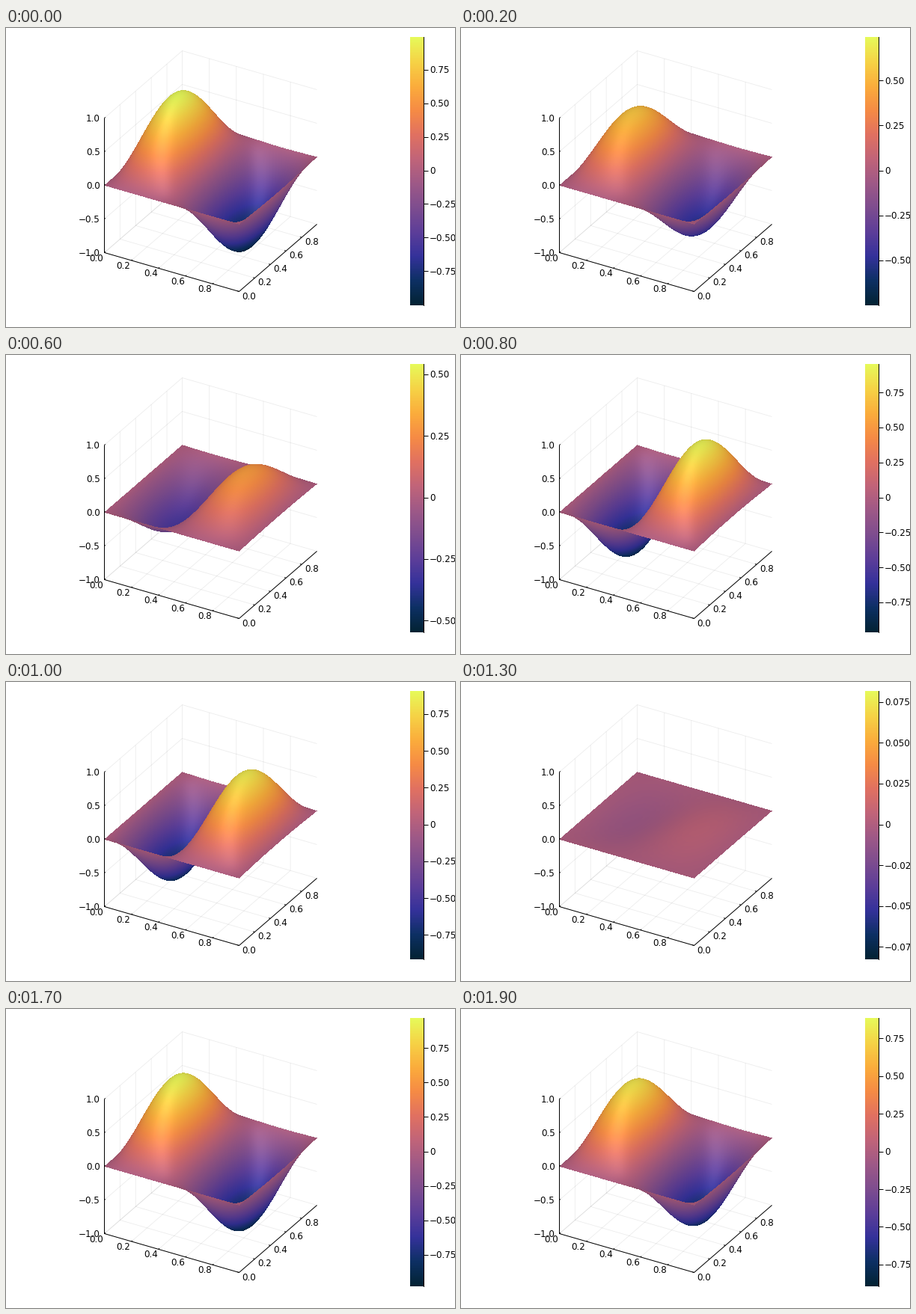
Animation of 600 by 400 pixels, one loop 2000 ms. Source, as a matplotlib script:

```python
import math

import numpy as np
import matplotlib.pyplot as plt
from matplotlib.animation import FuncAnimation
from matplotlib.collections import LineCollection
from matplotlib.colors import LinearSegmentedColormap

W, H, DPI = 600, 400, 100
PX = 72 / DPI                      # points per pixel
FRAMES, INTERVAL = 20, 100
PHASE0, PHASE_STEP = 0.0177, 0.3548
FONT_PX = 11.85
BASELINE = 0.34 * FONT_PX          # from the middle of a digit to its foot
X_MAX = 0.996                      # the grid stops just short of 1

# Projection: azimuth 30, elevation 30, orthographic
ORIGIN = np.array([131.5, 210.5])
EX = np.array([180.0, 52.0])
EY = np.array([104.0, -90.0])
EZ = np.array([0.0, -90.0])
VIEW = (0.433, -0.75, 0.5)

# Colour bar
BAR_L, BAR_R, BAR_TOP, BAR_BOTTOM = 540, 558, 12, 371
BAR_MID, BAR_HALF = 191, 179.5

THERMAL = [(3, 35, 51), (13, 48, 100), (53, 50, 155), (93, 62, 153),
           (126, 77, 143), (158, 89, 135), (193, 100, 121), (225, 113, 97),
           (246, 139, 69), (251, 173, 60), (246, 211, 70), (231, 250, 90)]
cmap = LinearSegmentedColormap.from_list("thermal", np.array(THERMAL) / 255, N=256)
lut = cmap(np.arange(256))[:, :3]


def project(u, v, z):
    """Unit square position plus height to stage pixels."""
    return tuple(ORIGIN + u * EX + v * EY + z * EZ)


def label(x, y, text="", ha="center"):
    return ax.text(x, y + BASELINE, text, ha=ha, va="baseline",
                   fontsize=FONT_PX * PX, family="DejaVu Sans", color="black", zorder=5)


def lines(segments, width, alpha=1.0, zorder=4):
    coll = LineCollection(segments, colors=[(0, 0, 0, alpha)],
                          linewidths=width * PX, zorder=zorder, snap=False)
    ax.add_collection(coll)
    return coll


def number(value, digits):
    return f"{value:.{digits}f}".replace("-", "\u2212")


def bar_ticks(amp):
    """Pick a pleasant tick step for the range -amp..amp."""
    best = (-1, 0, 0)
    for q, nice in ((1, 1), (5, 0.9), (2, 0.7), (2.5, 0.5), (3, 0.2)):
        for power in (-2, -1):
            step = q * 10.0 ** power
            half = math.floor(amp / step)
            count = 2 * half + 1
            if 4 <= count <= 8:
                score = (1 - abs(count - 5) / 5) / 4 + nice / 4 + half * step / amp / 3
                best = max(best, (score, step, half))
    _, step, half = best
    digits = next(d for d in range(1, 5) if abs(round(step, d) - step) < 1e-9)
    return [(i * step, number(i * step, digits) if i else "0")
            for i in range(-half, half + 1)]


fig = plt.figure(figsize=(W / DPI, H / DPI), dpi=DPI, facecolor="white")
ax = fig.add_axes([0, 0, 1, 1])
ax.axis("off")

# Grid, axes, ticks and labels of the box
grid, ticks = [], []
for value in (0, 0.2, 0.4, 0.6, 0.8):
    t = value / X_MAX
    grid.append([project(t, 0, -1), project(t, 1, -1), project(t, 1, 1)])
    grid.append([project(1, t, -1), project(0, t, -1), project(0, t, 1)])
    ticks.append([project(t, 0, -1), project(t, 0.012, -1)])
    ticks.append([project(1, t, -1), project(0.988, t, -1)])
    x, y = project(t, 0, -1)
    label(x - 10.5, y + 7, number(value, 1))
    x, y = project(1, t, -1)
    label(x + 13.5, y + 6, number(value, 1))
for value in (-1, -0.5, 0, 0.5, 1):
    grid.append([project(0, 0, value), project(0, 1, value), project(1, 1, value)])
    ticks.append([project(0, 0, value), project(0, 0.012, value)])
    x, y = project(0, 0, value)
    label(x - 6, y, number(value, 1), "right")

lines(grid, 0.9, 0.07, zorder=1)
lines(ticks, 1)
lines([[project(0, 0, 1), project(0, 0, -1), project(1, 0, -1), project(1, 1, -1)]], 1)

# Surface samples along the middle of each pixel column, from far to near
v, column = np.meshgrid(np.linspace(1, 0, 3000), np.arange(131, 416))
u = (column + 0.5 - ORIGIN[0] - v * EY[0]) / EX[0]
inside = (u >= 0) & (u <= 1)
u, v, column = u[inside], v[inside], column[inside]
base_y = ORIGIN[1] + u * EX[1] + v * EY[1]
angle_x, angle_y = 2 * np.pi * X_MAX * u, np.pi * X_MAX * v
shape = np.sin(angle_x) * np.sin(angle_y)
slope_x = np.pi * np.cos(angle_x) * np.sin(angle_y)
slope_y = np.pi / 2 * np.sin(angle_x) * np.cos(angle_y)


def surface(c):
    y = base_y + c * shape * EZ[1]
    row = y.astype(int)
    keep = np.abs(y - row - 0.5) < 0.25      # near the pixel centre
    z = c * shape[keep]
    nx, ny = -c * slope_x[keep], -c * slope_y[keep]
    facing = np.abs(nx * VIEW[0] + ny * VIEW[1] + VIEW[2]) / np.sqrt(nx * nx + ny * ny + 1)
    index = np.clip((z + 1) * 128, 0, 255).astype(int)
    shade = (0.84 + 0.15 * facing)[:, None]
    gloss = (0.09 * facing ** 12)[:, None]
    rgba = np.ones((z.size, 4))
    rgba[:, :3] = np.clip(lut[index] * shade + gloss, 0, 1)
    img = np.zeros((H, W, 4))
    img[row[keep], column[keep]] = rgba
    return img


picture = ax.imshow(np.zeros((H, W, 4)), extent=(0, W, H, 0), aspect="auto",
                    interpolation="nearest", zorder=3)
ax.imshow(lut[::-1, None, :], extent=(BAR_L, BAR_R, BAR_BOTTOM, BAR_TOP),
          aspect="auto", interpolation="nearest", zorder=2)
lines([[(BAR_R + 0.5, BAR_TOP), (BAR_R + 0.5, BAR_BOTTOM + 1)]], 1)
bar_marks = lines([], 1)
bar_labels = [label(566, 0, ha="left") for _ in range(8)]
ax.set_xlim(0, W)
ax.set_ylim(H, 0)


def draw(n):
    c = math.cos(PHASE0 + PHASE_STEP * n)
    picture.set_data(surface(c))
    marks = []
    for text in bar_labels:
        text.set_text("")
    for text, (value, name) in zip(bar_labels, bar_ticks(abs(c))):
        y = BAR_MID - BAR_HALF * value / abs(c)
        mark_y = math.floor(y) + 0.5
        marks.append([(BAR_R, mark_y), (BAR_R + 6.5, mark_y)])
        text.set_text(name)
        text.set_y(y + BASELINE)
    bar_marks.set_segments(marks)
    return [picture, bar_marks, *bar_labels]


anim = FuncAnimation(fig, draw, frames=FRAMES, interval=INTERVAL,
                     init_func=lambda: draw(0), repeat=True, repeat_delay=0, blit=False)
plt.show()
```
